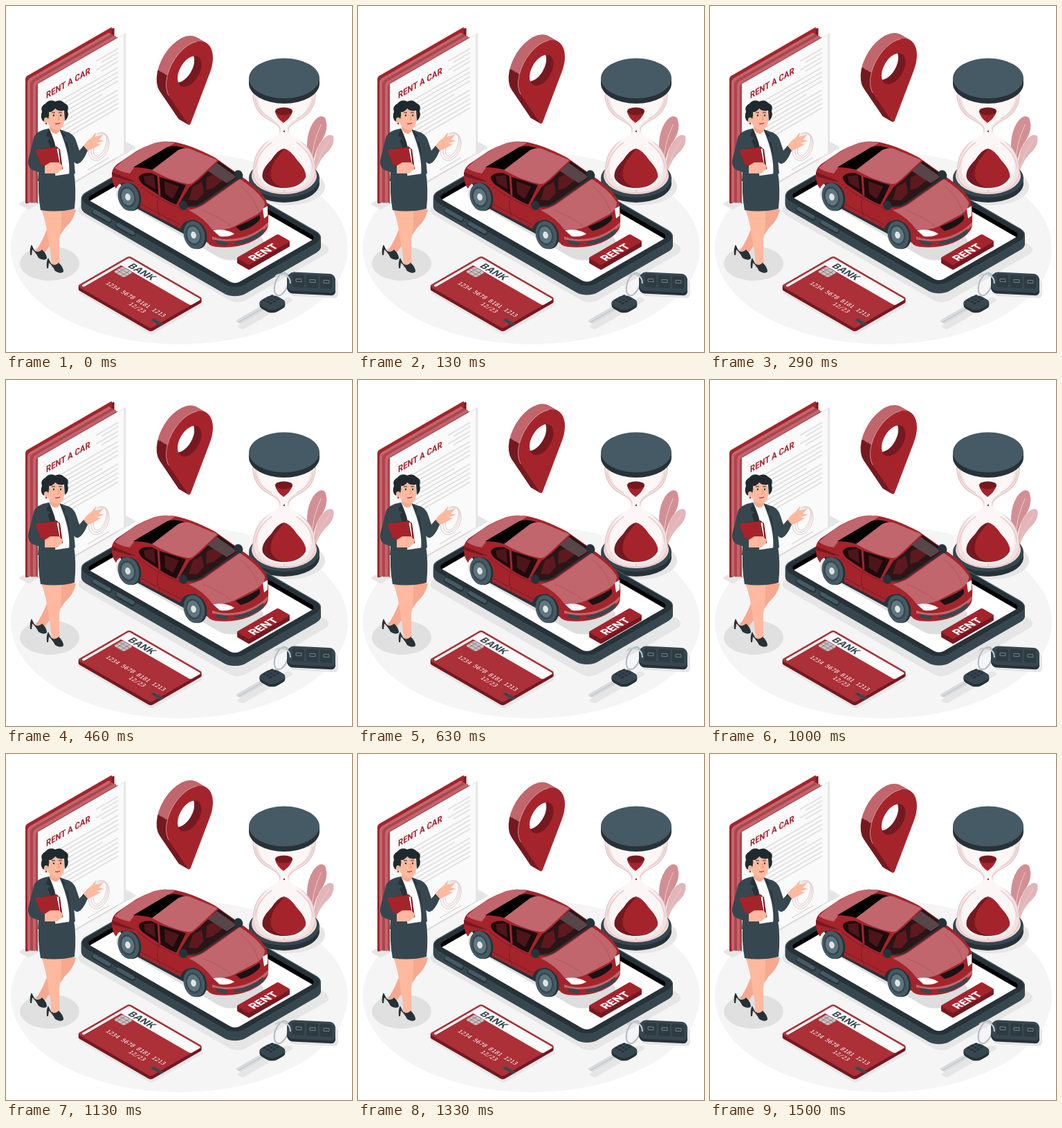
Recreate the animation shown at these times as an HTML page with a canvas. Size 500 px wide and 500 px high, loop 1540 ms.

```html
<!DOCTYPE html>
<html lang="en">
<head>
<meta charset="utf-8">
<title>Rent a car</title>
<style>
html, body { margin: 0; width: 100%; height: 100%; overflow: hidden; background: #fff; }
canvas { display: block; width: 100vw; height: 100vh; }
</style>
</head>
<body>
<canvas id="stage" width="500" height="500"></canvas>
<script>
const ctx = document.getElementById('stage').getContext('2d');
const RED = '#a5242c', ROSE = '#c0666c', WINE = '#751920';
const SLATE = '#37474f', STEEL = '#455a64', INK = '#263238';
const SKIN = '#ffb99f', BLUSH = '#f7a98f', SHADE = '#e6e6e6';

// Isometric axes: floor reading right-down, floor reading right-up, wall rising to the right
const C = .866, DOWN = [C, .5, -C, .5], UP = [C, -.5, C, .5], WALL = [C, -.5, 0, 1];

function path(fill, d, stroke, width = 1) {
  const shape = new Path2D(d);
  if (fill) { ctx.fillStyle = fill; ctx.fill(shape); }
  if (stroke) { ctx.strokeStyle = stroke; ctx.lineWidth = width; ctx.stroke(shape); }
}
function oval(fill, x, y, rx, ry, turn = 0, stroke, width = 1) {
  ctx.beginPath();
  ctx.ellipse(x, y, rx, ry, turn, 0, Math.PI * 2);
  if (fill) { ctx.fillStyle = fill; ctx.fill(); }
  if (stroke) { ctx.strokeStyle = stroke; ctx.lineWidth = width; ctx.stroke(); }
}
function on(axes, x, y, draw) {
  ctx.save();
  ctx.transform(...axes, x, y);
  draw();
  ctx.restore();
}
const shifted = (x, y, draw) => on([1, 0, 0, 1], x, y, draw);
function mirrored(x, draw) {
  for (const side of [1, -1]) on([side, 0, 0, 1], x, 0, draw);
}
function rect(fill, x, y, w, h, r = 0) {
  ctx.fillStyle = fill;
  ctx.beginPath();
  ctx.roundRect(x, y, w, h, r);
  ctx.fill();
}
function plate(fill, axes, x, y, w, h, r) {
  on(axes, x, y, () => rect(fill, 0, 0, w, h, r));
}
// Stacked copies of a plate give it a solid edge
function slab(axes, x, y, w, h, r, depth, side, top) {
  for (let d = depth; d >= 0; d--) plate(d ? side : top, axes, x, y + d, w, h, r);
}
function text(str, axes, x, y, font, fill, align = 'left') {
  on(axes, x, y, () => {
    ctx.font = font;
    ctx.fillStyle = fill;
    ctx.textAlign = align;
    ctx.fillText(str, 0, 0);
  });
}

function floor() {
  rect('#fff', 0, 0, 500, 500);
  oval('#f5f5f5', 250.5, 350, 243.5, 139);
  plate(SHADE, UP, 18, 286, 180, 17, 2);
  plate(SHADE, DOWN, 236, 215, 274, 160, 14);
  plate(SHADE, DOWN, 180, 369, 124, 89, 5);
  plate(SHADE, UP, 333, 463, 86, 10, 4);
  plate(SHADE, [1, .05, 0, 1], 410, 391, 70, 28, 6);
  oval(SHADE, 408, 261, 53, 27);
  oval('#e0e0e0', 63, 372, 43, 25);
}

function contract() {
  plate(WINE, WALL, 31, 103.5, 145, 182, 2);
  plate(RED, WALL, 28, 102.5, 145, 184, 3);
  for (let i = 1; i < 5; i++)
    plate(i % 2 ? ROSE : '#ad454c', WALL, 27 + 4 * i, 104 + 2.2 * i, 139, 182 - 2 * i, 5);
  plate('#e3e3e3', WALL, 46, 112.5, 146.5, 172.5);
  plate('#fafafa', WALL, 46.5, 113, 143, 171);
  text('RENT A CAR', WALL, 58, 134, 'bold 13px Roboto, sans-serif', RED);
  const rule = (x, y, length) => plate('#dfdfdf', WALL, x, y, length / C, 2);
  for (let i = 0; i < 4; i++) rule(i % 2 ? 138 : 130, (i % 2 ? 74 : 79) + 6.3 * i, i % 2 ? 24 : 32);
  for (let i = 0; i < 10; i++) rule(80, 135 + 6.5 * i, i === 4 ? 60 : 82);
  rule(118, 236, 31);
  for (let i = 0; i < 3; i++) oval(null, 134 + i, 203 - i, 14 - 3 * i, 21 - 2 * i, .35, '#dfc8c9');
}

function shoe(x, y) {
  path(INK, `M${x} ${y}q-3 4 -2 15h2l1 -8q5 4 9 12 8 5 12 1 0 -7 -7 -13 -5 6 -11 1Z`);
}

function woman() {
  path(BLUSH, 'M74 294H101Q98 310 85 321 76 336 62 348L49 366 43 354Q53 339 58 325Z');
  path(SKIN, 'M51 293H80Q81 320 77 338 77 360 78 377L66 378Q65 355 61 337 58 313 51 293Z');
  shoe(37, 345);
  shoe(61, 364);
  path(SLATE, 'M48 242L98 239Q102 264 99 293 75 299 50 295 45 270 48 242Z');
  // Outstretched arm
  path(SKIN, 'M110 205Q117 194 124 190L130 182 129 189 141 186 134 193 142 195 131 198 137 200Q128 205 115 211Z');
  path(SLATE, 'M88 182Q97 184 101 194L106 209 112 202 118 209Q111 226 104 228 99 229 94 218Z');
  // Torso
  path('#fff', 'M61 177L78 178Q88 190 94 242L67 246Z');
  path(SLATE, 'M77 178L91 183Q97 187 96 200L100 242 91 245Q94 217 77 178Z');
  path(SLATE, 'M62 177Q43 180 40 191L32 223Q31 232 38 236L47 240 46 253H72Q70 236 72 204 68 188 62 177Z');
  path(INK, 'M62 177L58 188 64 191 60 195 72 220 70 198ZM78 178L86 187 83 191 89 198 93 223 86 195Z');
  // Folder and hand
  path(WINE, 'M42 208L73 203 78 207 82 236 54 239Z');
  path('#fff', 'M45 208L76 206 79 233 55 236Z');
  path(RED, 'M42 208L73 204 79 234 54 239Z');
  path(SLATE, 'M33 222L57 231 56 243 38 237Q31 233 33 222Z');
  path(SKIN, 'M56 231L64 226H76L81 230V236L74 242H56Z');
  // Head
  path(BLUSH, 'M63 170H78V179Q73 190 63 179Z');
  path(SKIN, 'M58 151Q64 143 80 147 87 157 83 172 78 182 69 178 60 174 58 161Z');
  path('#1f2a30', 'M53 166Q49 160 52 153 49 145 57 141 63 134 71 138 79 134 84 140 92 143 89 152 92 160 85 166L84 151Q76 153 71 148 67 154 62 153 63 161 59 168Z');
  oval(SKIN, 58, 165, 3, 4);
  oval(RED, 58, 170, 1.2, 1.2);
  for (const x of [69, 79]) {
    oval(INK, x, 158, 1.1, 1.6);
    path(null, `M${x - 3} 154h5`, INK);
  }
  path(null, 'M75 158L77 164 74 165', '#e98670', .8);
  path(null, 'M71 170Q75 171 78 169', RED, 1.2);
}

function phone() {
  slab(DOWN, 233, 201, 267, 154, 18, 13, SLATE, STEEL);
  plate(INK, DOWN, 233, 202.5, 265, 152, 17);
  on(DOWN, 233, 201, () => {
    rect('#000', 9, 9, 249, 136, 8);
    ctx.clip();
    rect('#fff', 16, 16, 249, 136, 8);
  });
  ctx.lineCap = 'round';
  for (const x of [128, 162]) {
    const y = 298 + (x - 128) * .56;
    path(null, `M${x} ${y}l21 12`, INK, 8);
    path(null, `M${x} ${y - 1}l21 12`, STEEL, 5.5);
  }
  ctx.lineCap = 'butt';
}

function wheel(x, y) {
  const ring = (fill, size, dx = 0) => oval(fill, x + dx, y, 15 * size, 20.5 * size, -.25);
  ring(INK, 1, 3);
  ring(STEEL, 1);
  ring(SLATE, .74, -1);
  ring('#607680', .6, -1);
  ring('#dfe4e6', .25, -1);
}

function car() {
  plate('#dedede', DOWN, 205, 238, 206, 66, 22);
  path(INK, 'M160 250L192 247 194 280 250 298 292 305V342L262 332 190 293Z');
  path(RED, 'M153 246Q152 236 160 229L188 210Q212 196 238 196 262 198 302 219L340 246Q366 264 375 279 380 290 379 316 378 330 352 342 330 351 303 348 291 346 290 338 288 314 272 309 255 309 252 322L194 292Q193 262 178 256 163 253 159 264 153 256 153 246Z');
  path(ROSE, 'M157 234Q180 212 214 198 232 193 244 198L186 232 179 242Q166 240 157 234Z');
  path(WINE, 'M153 240L188 254 178 253 154 246Z');
  path('#000', 'M184 233L233 204Q244 200 260 206L213 237Q198 233 184 233Z');
  path(ROSE, 'M211 237L249 208Q257 204 265 206L304 222Q308 225 300 231L277 251Q270 258 262 257 236 252 211 237Z');
  // Side glass and door seams
  path('#1b0b0d', 'M192 247Q196 240 209 241L222 247 260 259 246 287Q232 282 216 270L198 258Q192 253 192 247Z');
  path('#4f1419', 'M199 246L214 244 216 265 201 256ZM229 253L250 261 241 279 230 271Z');
  path(null, 'M220 245L222 274', RED, 3);
  path(null, 'M191 258Q217 279 256 294M221 273Q216 289 222 305M194 286L252 316', WINE, .8);
  // Windshield with seats behind it
  path('#2a1517', 'M307 224L337 245Q338 249 333 252L282 287Q272 291 262 290L249 286 266 260 279 251Z');
  path('#5e191f', 'M270 261L283 254 286 270 276 281 264 280ZM290 248L304 241 313 252 300 263 289 266Z');
  path('#56464a', 'M305 227L333 247 319 256 291 238Z');
  path(null, 'M262 290Q276 291 284 285L336 248', INK, 2.2);
  path(null, 'M306 224L278 250Q270 257 264 261L249 286', RED, 2);
  for (const [x, y] of [[256, 288], [336, 244]]) oval(INK, x, y, 6, 7, -.5);
  // Hood and nose
  path(ROSE, 'M264 295Q278 292 286 287L338 250Q364 267 374 284 375 293 363 301L329 319Q314 325 298 323 286 306 264 295Z');
  path(null, 'M284 295Q311 306 325 318M339 260Q359 276 365 298', '#b15359', .8);
  path('#fff', 'M299 324Q317 321 330 329 325 334 309 333ZM371 293L378 289V303L373 307Z');
  path('#171315', 'M332 319Q350 312 366 302 369 306 365 311 353 322 339 325Z');
  path(ROSE, 'M298 333Q318 341 346 333 366 326 379 312V317Q367 331 346 337 316 343 298 337Z');
  path(SLATE, 'M302 338L321 341 319 346 305 344ZM329 341Q353 337 372 322V329Q355 342 331 345Z');
  wheel(177, 276);
  wheel(272, 331);
}

function rentButton() {
  slab(UP, 333, 364, 69, 21, 2, 7, WINE, RED);
  text('RENT', UP, 376.5, 358.5, '800 15.5px Inter, sans-serif', '#fff', 'center');
}

function leaf(fill, x, y, size, turn) {
  on([size, 0, 0, size], x, y, () => {
    ctx.rotate(turn);
    path(fill, 'M0 0Q-18 -40 -8 -66 0 -82 8 -76 18 -60 7 -38 1 -20 4 0Z');
    path(null, 'M2 -4Q-4 -34 4 -66', '#f1d5d7', .8);
  });
}

function hourglass() {
  leaf('#d28f94', 439, 235, 1, .19);
  leaf('#e2b6b9', 445, 238, .74, .42);
  oval(INK, 402, 256, 51, 28);
  oval(SLATE, 402, 249, 51, 28);
  oval('#f0dada', 402, 245, 47, 27);
  const bulbs = 'M0 122H45Q47 152 21 165 5 173 6 181 6 187 19 193 45 207 45 241 41 270 0 270Z';
  const sand = 'M0 206Q9 208 19 223 33 238 31 248 22 263 0 263Z';
  mirrored(402, () => path('#f3e2e2', bulbs, '#e3c3c5', 1.2));
  mirrored(402, () => on([.86, 0, 0, .97], 0, 3, () => path('#fcf6f6', bulbs)));
  mirrored(402, () => path(null, 'M42 134Q39 153 18 163M42 235Q39 212 18 197', '#e9cccd', 1.6));
  mirrored(402, () => path(RED, sand));
  path(WINE, 'M402 206Q393 207 383 223 368 237 371 249 378 262 402 263 372 255 388 224Z');
  path(RED, 'M389 153L414 153Q411 162 401 169 391 162 389 153Z');
  oval(WINE, 401.5, 152, 12.5, 5.5);
  oval(RED, 402, 181, 1.2, 1.2);
  oval(INK, 402, 112, 51, 29);
  rect(INK, 351, 104, 102, 8);
  oval(STEEL, 402, 104.5, 51, 29);
}

// A disc with tangents meeting in a tip, standing on the wall plane
function drop(fill, radius, tip) {
  const half = Math.acos(radius / tip);
  ctx.beginPath();
  ctx.arc(0, 0, radius, Math.PI / 2 + half, Math.PI / 2 - half);
  ctx.lineTo(2, tip - 2);
  ctx.quadraticCurveTo(0, tip, -2, tip - 2);
  ctx.closePath();
  ctx.fillStyle = fill;
  ctx.fill();
}

function pin() {
  const x = 265.2, y = 94.5, depth = 16, hole = 20;
  for (let d = depth; d >= 0; d--) on(WALL, x - d * C, y - d / 2, () => {
    const sides = ctx.createLinearGradient(0, -40, 0, 40);
    sides.addColorStop(.35, ROSE);
    sides.addColorStop(.35, WINE);
    drop(d ? sides : RED, 39, 78);
  });
  on(WALL, x, y, () => {
    ctx.beginPath();
    ctx.arc(0, 0, 39, Math.PI * .85, Math.PI * 1.6);
    ctx.strokeStyle = '#e0b3b6';
    ctx.lineWidth = .7;
    ctx.stroke();
    oval(WINE, 0, 0, hole, hole);
    ctx.clip();
    oval('#fff', -depth * .75, -depth * .75, hole, hole);
  });
}

function card() {
  slab(DOWN, 178, 361, 123, 87, 4, 5, WINE, '#ab3038');
  on(DOWN, 178, 361, () => {
    rect('#fafafa', 3, 3, 120, 17.5, 3);
    rect('#fafafa', 3, 3, 4, 80, 2);
    rect('#c9c2c3', 10, 21, 17, 15, 3);
    ctx.strokeStyle = '#8d7a7c';
    ctx.lineWidth = .8;
    ctx.strokeRect(15, 21, 7, 15);
    ctx.strokeRect(10, 26, 17, 5);
    rect(SLATE, 111, 70, 17, 5, 1);
  });
  text('BANK', DOWN, 175, 376.5, 'bold 14px Inter, sans-serif', SLATE);
  const mono = '8.5px "DejaVu Sans Mono", monospace';
  text('1234 5678 8181 1213', DOWN, 143, 401, mono, '#fff');
  text('12/23', DOWN, 176, 431, mono, '#fff');
}

function keys() {
  const tilt = [1, .05, 0, 1];
  oval(null, 398, 402, 9, 17, .35, '#b4bcc0', 2);
  on(UP, 385, 428, () => {
    rect('#d9dcde', -58, -4, 50, 9, 2);
    rect('#bfc5c8', -58, 0, 50, 1.5);
  });
  slab(UP, 362, 429, 27, 26, 9, 4, INK, SLATE);
  on(UP, 376, 428, () => {
    for (let i = 0; i < 9; i++) rect(INK, i % 3 * 6, (i / 3 | 0) * 5 - 6, 4, 3, 1);
  });
  oval('#f5f5f5', 400, 420, 3, 2);
  slab(tilt, 406, 384, 70, 27, [11, 8, 6, 8], 4, INK, SLATE);
  on(tilt, 414, 388, () => {
    for (let i = 0; i < 3; i++) {
      rect('#2d3b42', 20 * i, 0, 17, 18, 2);
      ctx.strokeStyle = '#87949a';
      ctx.lineWidth = .8;
      ctx.strokeRect(20 * i + 5, 6, 8, 4);
    }
  });
  path(null, 'M389 391Q394 385 404 389 411 392 411 401', '#c4cacd', 2);
}

const FRAME = 1000 / 24, LOOP = 1540, RISE = 10, HALF = 750;

// Linear float up and down, stepped at 24 pictures per second
function lift(now) {
  const t = Math.floor((now % LOOP + 5) / FRAME) * FRAME;
  return -RISE * Math.max(0, Math.min(t, 2 * HALF - t)) / HALF;
}

let start;
function render(now) {
  start ??= now;
  const dy = lift(now - start);
  floor();
  contract();
  woman();
  hourglass();
  shifted(0, dy, phone);
  car();
  rentButton();
  shifted(0, dy, pin);
  card();
  keys();
  requestAnimationFrame(render);
}
requestAnimationFrame(render);
</script>
</body>
</html>
```
